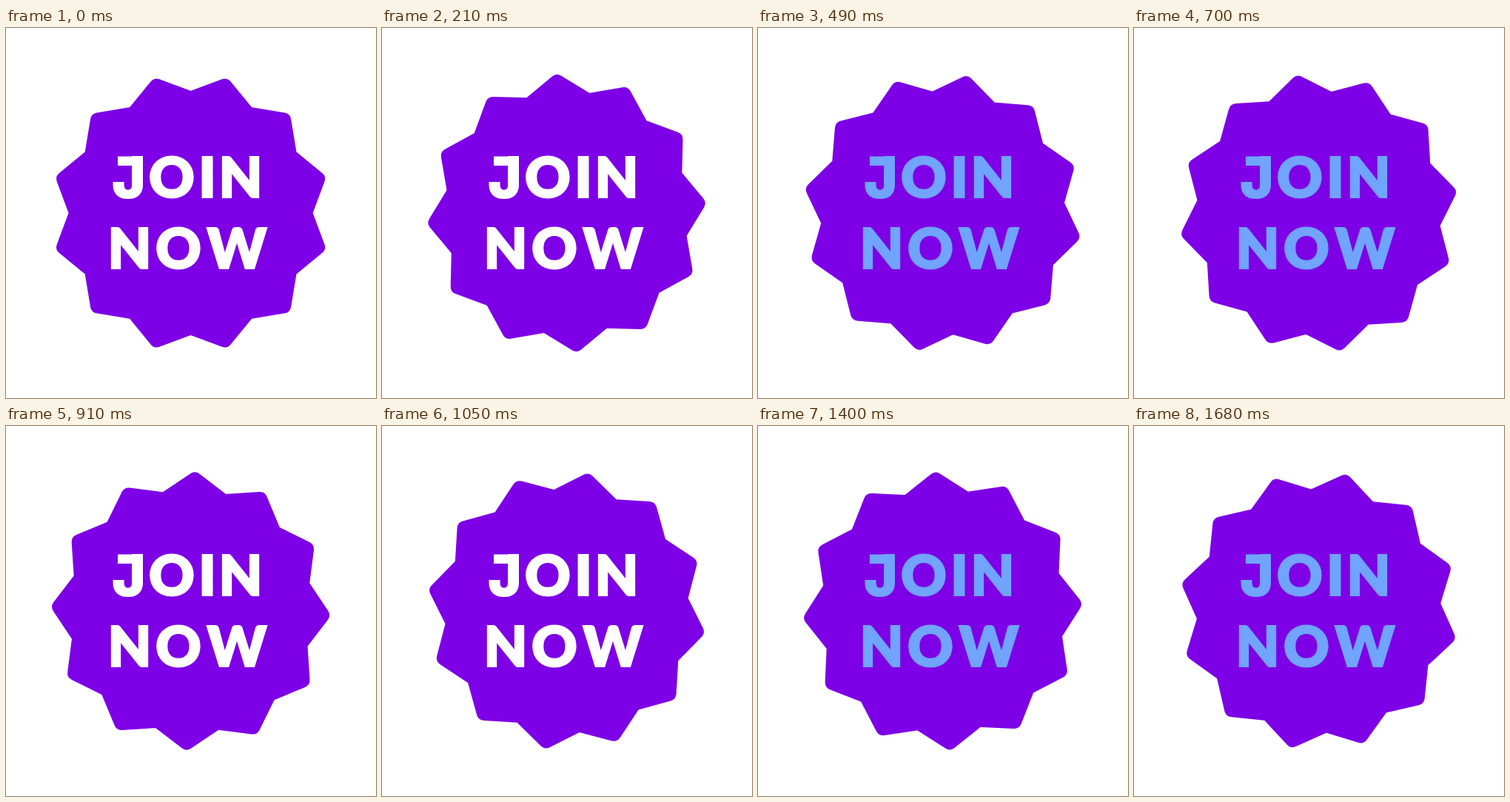
Animation of 500x500 px, one loop 1.75 s. Source, as an HTML page:

```html
<!DOCTYPE html>
<html lang="en">
<head>
<meta charset="utf-8">
<title>Join now badge</title>
<style>
  html, body { margin: 0; width: 100%; height: 100%; overflow: hidden; background: #fff; }
  svg { display: block; width: 100vw; height: 100vh; }
  #badge { fill: #7d00e6; stroke: #7d00e6; stroke-width: 21; stroke-linejoin: round; }
  #label {
    font: 900 76px Lato, sans-serif; text-anchor: middle;
    fill: currentColor; stroke: currentColor; stroke-width: 2;
  }
  #label tspan { font-family: Inter, sans-serif; font-weight: 800; }
</style>
</head>
<body>
<svg viewBox="0 0 500 500">
  <polygon id="badge"/>
  <g id="label">
    <rect x="152" y="174.5" width="24" height="10.5"/>
    <text x="166 224 272 317" y="229"><tspan>J</tspan>OIN</text>
    <text x="167 233 312" y="325">NOW</text>
  </g>
</svg>
<script>
  const LOOP = 1750, STEP = 70, TEETH = 12;
  const TIP = 177, NOTCH = 153.8;
  const badge = document.getElementById('badge');
  const label = document.getElementById('label');

  // The round stroke softens the tips and keeps the notches sharp.
  badge.setAttribute('points', Array.from({ length: TEETH * 2 }, (_, i) => {
    const angle = i * Math.PI / TEETH;
    const radius = i % 2 ? TIP : NOTCH;
    return [radius * Math.sin(angle), -radius * Math.cos(angle)];
  }).join(' '));

  function draw(now) {
    const time = Math.floor(now % LOOP / STEP) * STEP;
    const turn = 90 * time / LOOP;
    const isBlue = Math.floor(4 * time / LOOP) % 2;
    badge.setAttribute('transform', `translate(249.6 250) rotate(${turn})`);
    label.style.color = isBlue ? '#70a4ff' : '#fff';
  }

  const start = performance.now();
  function tick() {
    draw(performance.now() - start);
    requestAnimationFrame(tick);
  }
  tick();
</script>
</body>
</html>
```
